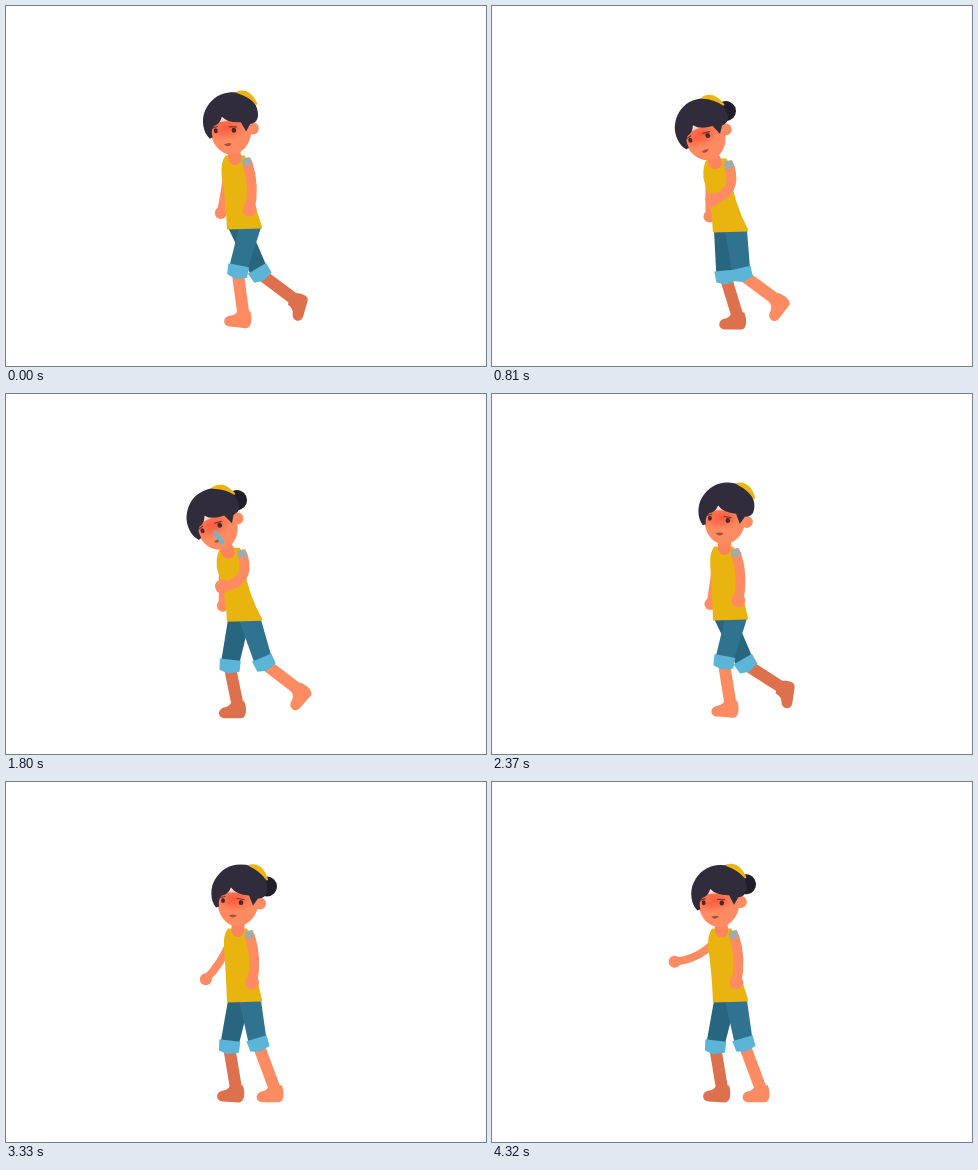
An HTML page for the animation above (4350 ms loop, 480 by 360 pixels).

```html
<!DOCTYPE html>
<html lang="en">
<head>
<meta charset="utf-8">
<title>Weary walk</title>
<style>
  html, body { margin: 0; width: 100%; height: 100%; overflow: hidden; background: #fff; }
  svg { display: block; width: 100vw; height: 100vh; }
  .limb { fill: none; stroke-linecap: round; stroke-linejoin: round; }
</style>
</head>
<body>
<svg viewBox="0 0 480 360">
  <defs>
    <radialGradient id="flush">
      <stop offset="0" stop-color="#ff4028" stop-opacity=".65"/>
      <stop offset=".5" stop-color="#ff4a30" stop-opacity=".4"/>
      <stop offset="1" stop-color="#ff6a48" stop-opacity="0"/>
    </radialGradient>
    <path id="foot" d="M6-6C9 0 9 11 3 11H-13C-21 11-21 1-13 0Q-8-1-6-7Z"/>
  </defs>

  <g id="farArm" stroke="#ff8b63" fill="#ff8b63">
    <path class="limb" stroke-width="8"/>
    <circle r="6" stroke="none"/>
  </g>
  <g id="farLeg"></g>
  <g id="nearLeg"></g>
  <path id="shirt" fill="#e9b410"/>

  <g id="head">
    <circle id="bun" cy="-44" r="10" fill="#211d29"/>
    <path class="limb" d="M0-16V0" stroke="#fb845c" stroke-width="13"/>
    <path d="M-20-38H20V-24C18-12 8-4-1-4C-12-5-20-15-20-27Z" fill="#ff8b63"/>
    <ellipse cx="-4" cy="-31" rx="22" ry="13" fill="url(#flush)"/>
    <circle cx="22" cy="-27" r="6" fill="#ff8b63"/>
    <g fill="#4a2a28">
      <ellipse cx="-15" cy="-30" rx="2" ry="2.5"/>
      <ellipse cx="3" cy="-28" rx="2.3" ry="2.5"/>
    </g>
    <path class="limb" d="M-18-33L-13-34M-1-32L6-31" stroke="#7a3328" stroke-width="1.2"/>
    <path d="M-9-15Q-5-17-1-15Q-5-11-9-15Z" fill="#a8503a"/>
    <path id="drip" class="limb" stroke="#74b4c4" stroke-width="4.5"/>
    <path d="M-22-23C-28-30-28-43-23-51C-17-61-8-66 2-66C18-66 27-58 29-46C30-38 28-32 20-32L15-25L11-35Q-2-36-7-43Q-10-36-16-35Q-20-32-19-24Z" fill="#302c3b"/>
    <path d="M12-65Q24-67 29-51Q23-60 12-65Z" fill="#edb511" stroke="#edb511" stroke-width="2" stroke-linejoin="round"/>
  </g>

  <g id="nearArm" stroke="#ff8b63" fill="#ff8b63">
    <path class="limb" stroke-width="10"/>
    <circle r="7" stroke="none"/>
    <rect x="-5" y="-5" width="9" height="8" rx="2" fill="#a3aaa8" stroke="none"/>
  </g>
</svg>

<script>
const LOOP = 4350, FRAME = 30, CYCLE = 1170, STEP = CYCLE / 2;
const NEAR_STOP = 2730, FAR_STOP = 2925;
const $ = id => document.getElementById(id);
const set = (node, attrs) => { for (const k in attrs) node.setAttribute(k, attrs[k]); };
const mod = (a, n) => ((a % n) + n) % n;
const wave = (t, peak, period = CYCLE) => Math.cos(2 * Math.PI * (t - peak) / period);
const bell = (t, peak, width) => Math.exp(-(((t - peak) / width) ** 2));
const sind = a => Math.sin(a * Math.PI / 180);
const cosd = a => Math.cos(a * Math.PI / 180);

// Smooth curve through a few [time, value] points.
function curve(points) {
  const slope = i => {
    const a = points[Math.max(i - 1, 0)], b = points[Math.min(i + 1, points.length - 1)];
    return (b[1] - a[1]) / (b[0] - a[0]);
  };
  return t => {
    let i = 0;
    while (i < points.length - 2 && t > points[i + 1][0]) i++;
    const [t0, a] = points[i], [t1, b] = points[i + 1], d = t1 - t0;
    const u = Math.min(Math.max((t - t0) / d, 0), 1), v = 1 - u;
    return v * v * ((1 + 2 * u) * a + u * d * slope(i)) + u * u * ((3 - 2 * u) * b - v * d * slope(i + 1));
  };
}

const headTilt = curve([[0, -8], [675, -24], [1240, -8], [1800, -24], [2370, 1], [3330, 0], [LOOP, -6]]);
const reachAngle = curve([[2600, 0], [2980, 60], [3400, 31], [4200, 64], [LOOP, 64]]);
// Shin tilt over one stride: planted, pushing off, swinging through.
const shinTilt = curve([[-90, 5], [0, 8], [390, 23], [750, 60], [1080, 5], [CYCLE, 8]]);

const legs = [
  { id: 'farLeg', skin: '#de714d', cloth: '#28657f', hip: 233, knee: 238.5, swing: 15.5, thigh: 45, droop: 2.5, offset: STEP, lead: 45, stop: FAR_STOP },
  { id: 'nearLeg', skin: '#ff8b63', cloth: '#2f7391', hip: 244, knee: 245, swing: 13.5, thigh: 42.5, droop: 1.65, offset: 0, lead: 0, stop: NEAR_STOP }
];
for (const { id, skin, cloth } of legs) {
  $(id).innerHTML = `<path class="limb" stroke="${skin}" stroke-width="12"/>
    <use href="#foot" fill="${skin}"/><path fill="${cloth}"/><path fill="#5cb4d7"/>`;
}

function drawLeg(leg, t, waist) {
  const phase = Math.min(t, leg.stop) - leg.offset;
  const tilt = shinTilt(mod(phase + leg.lead, CYCLE));
  const kx = leg.knee + leg.swing * wave(phase, 580), ky = waist + leg.thigh;
  const lift = Math.max(0, tilt - 24);
  const ax = kx + 45 * sind(tilt);
  const ay = 309 + .55 * (waist - 219) - .55 * lift;
  const angle = 2 * Math.max(0, 11 - tilt) - leg.droop * lift;

  const len = Math.hypot(kx - leg.hip, ky - waist);
  const dx = (kx - leg.hip) / len, dy = (ky - waist) / len;
  // Point beside the knee: "along" the thigh and "across" it.
  const at = (along, across) => `${kx + dx * along - dy * across} ${ky + dy * along + dx * across}`;
  const [shin, foot, thigh, cuff] = $(leg.id).children;
  set(shin, { d: `M${kx} ${ky}L${ax} ${ay}` });
  set(foot, { transform: `translate(${ax} ${ay}) rotate(${angle})` });
  set(thigh, { d: `M${leg.hip - 11} ${waist - 1}H${leg.hip + 11}L${at(0, -9)}L${at(0, 9)}Z` });
  set(cuff, { d: `M${at(-7, -10)}L${at(4, -11)}L${at(8, 0)}L${at(6, 9)}L${at(-5, 11)}Z` });
}

// Elbow and hand are offsets from the shoulder.
function drawArm(id, x, y, ex, ey, hx, hy) {
  const [arm, hand] = $(id).children;
  set(arm, { d: `M${x} ${y}q${1.6 * ex - .3 * hx} ${1.6 * ey - .3 * hy} ${hx} ${hy}` });
  set(hand, { cx: x + hx, cy: y + hy });
}

function waistAt(t) {
  const walk = 220.7 + 9.5 * wave(Math.min(t, FAR_STOP), 128, STEP);
  const u = Math.min(Math.max((t - FAR_STOP) / 150, 0), 1);
  return walk + (219.5 - walk) * u * u * (3 - 2 * u);
}

function draw(t) {
  const waist = waistAt(t), neckY = waist - 73;
  const tilt = headTilt(t), neckX = 232 + .3 * tilt;
  const walkTime = Math.min(t, NEAR_STOP);

  for (const leg of legs) drawLeg(leg, t, waist);

  set($('shirt'), { d: `M${neckX - 10} ${neckY}H${neckX + 9}Q${neckX + 13} ${neckY + 6} ${neckX + 13} ${neckY + 18}
    Q${neckX + 17} ${waist - 28} 256 ${waist - 2}V${waist}L221 ${waist + 1}
    Q220 ${waist - 28} ${neckX - 14} ${neckY + 20}Q${neckX - 15} ${neckY + 6} ${neckX - 10} ${neckY}Z` });

  // The head hangs forward and down as it tilts.
  set($('head'), { transform: `translate(${neckX + .1 * tilt} ${neckY + 2 + .1 * Math.abs(tilt)}) rotate(${tilt})` });
  const phase = mod(t + STEP, CYCLE) - STEP;
  set($('bun'), { cx: 29 - (t < NEAR_STOP ? 21 * bell(phase, 15, 60) : 0) });
  const drip = 12 * bell(t, 1850, 280);
  set($('drip'), { d: `M-4-23l${drip * .2} ${drip}`, visibility: drip > .5 ? 'visible' : 'hidden' });

  const raise = Math.max(0, wave(walkTime, 690));
  const shoulderX = neckX + 12, shoulderY = neckY + 8;
  drawArm('nearArm', shoulderX, shoulderY, 5 - 4 * raise, 23, 2 - 24 * raise, 46 - 16 * raise);
  set($('nearArm').lastElementChild, { transform: `translate(${shoulderX} ${shoulderY - 1}) rotate(-12)` });

  const angle = Math.max(-10 + 20 * Math.max(0, wave(walkTime, -60)), reachAngle(t));
  drawArm('farArm', neckX - 8, neckY + 14, -23 * sind(.8 * angle), 23 * cosd(.8 * angle), -44 * sind(angle), 44 * cosd(angle));
}

const start = performance.now();
function tick() {
  const t = (performance.now() - start) % LOOP;
  draw(Math.floor(t / FRAME) * FRAME);
  requestAnimationFrame(tick);
}
draw(0);
requestAnimationFrame(tick);
</script>
</body>
</html>
```
